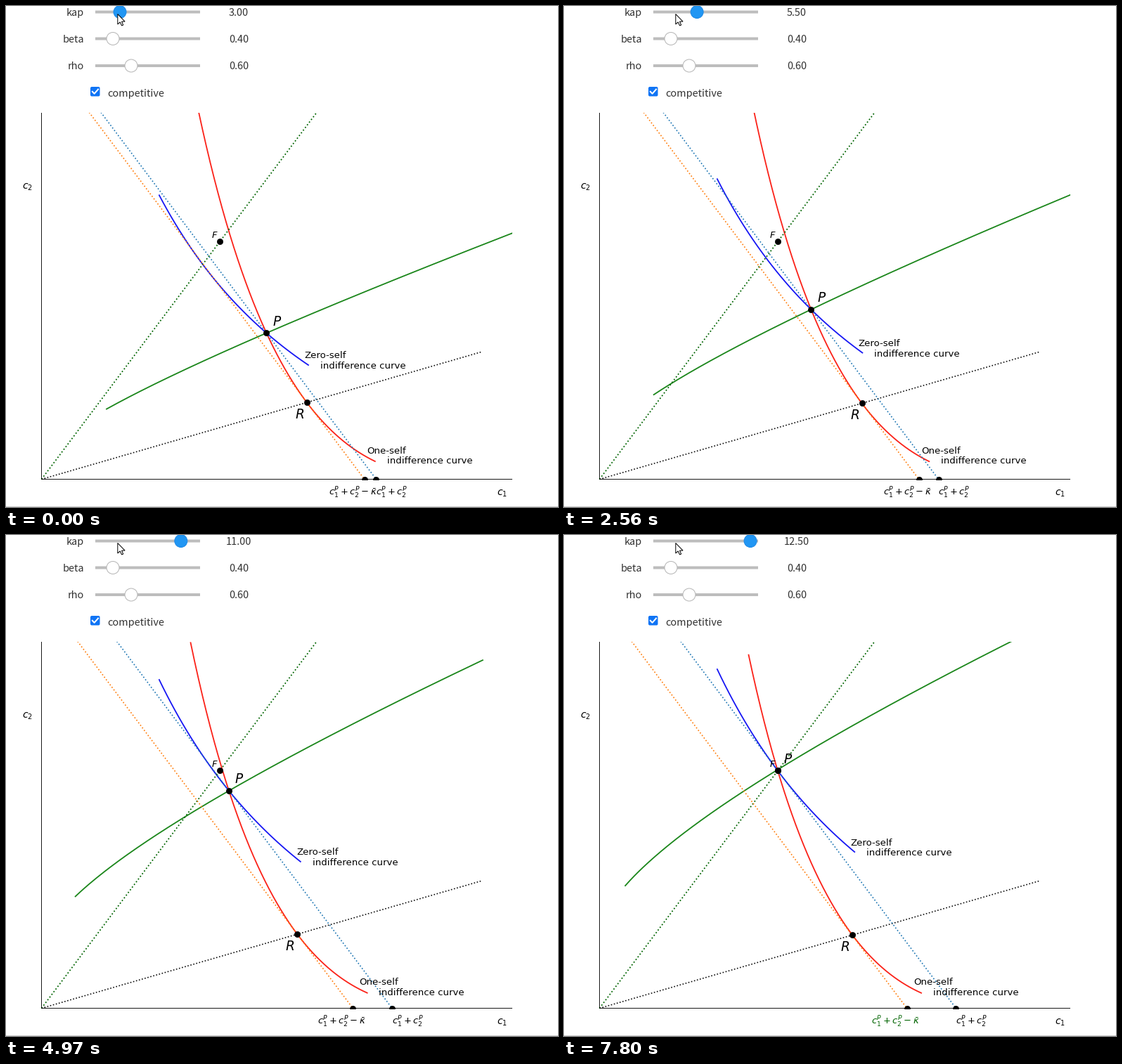
Recreate the animation shown at these times as a matplotlib script. Size 785 px wide and 713 px high, loop 8000 ms.

```python
import numpy as np
import matplotlib.pyplot as plt
from matplotlib.animation import FuncAnimation
from matplotlib.patches import Circle, FancyBboxPatch, Polygon, Rectangle

W, H, DPI = 785, 713, 64
PT = 72 / DPI                      # points per pixel
LOOP, STEP = 8000, 40
X0, Y0, SX, SY = 50.5, 673.5, 5.58, 7.443
BETA, RHO, WEALTH = 0.4, 0.6, 300
E = 1 - RHO
UI = ["Noto Sans CJK JP", "DejaVu Sans"]
INK = "#333333"
LAG = 400                          # the plot follows the slider this late


def kappa_at(t):
    """Key presses speed up, pause, then step back; each press moves 0.5."""
    presses = np.interp(t, [860, 1170, 2560, 5930, 7170, 7610],
                        [0, 1.05, 5.5, 21.05, 21.05, 19.05])
    return 3 + 0.5 * int(presses)


# ---- model -------------------------------------------------------------
RATIO = BETA ** (1 / RHO)          # c2 / c1 preferred by the one-self
R_SHARE = 1 / (1 + RATIO)
FIRST_BEST = WEALTH * RATIO / (1 + 2 * RATIO)


def one_self(c1, c2):
    return c1 ** E + BETA * c2 ** E


share = np.linspace(0.01, R_SHARE - 1e-3, 6000)
loss = 1 - (one_self(share, 1 - share) / one_self(R_SHARE, 1 - R_SHARE)) ** (1 / E)


def solve(kappa):
    """Contract point, whether kappa binds, and the feasible locus."""
    total = kappa / loss
    sums = np.arange(30, 180)
    s = np.interp(sums, total, share)
    locus = s * sums, (1 - s) * sums
    binds = np.interp(0.5, share, total) < 2 * FIRST_BEST
    if not binds:
        return FIRST_BEST, FIRST_BEST, binds, locus
    ok = (share >= 0.5) & (total < WEALTH - 1)
    a, m = share[ok], total[ok]
    utility = (WEALTH - m) ** E + BETA * m ** E * (a ** E + (1 - a) ** E)
    i = utility.argmax()
    return a[i] * m[i], (1 - a[i]) * m[i], binds, locus


def to_px(c1, c2):
    return X0 + SX * np.asarray(c1), Y0 - SY * np.asarray(c2)


# ---- stage -------------------------------------------------------------
fig = plt.figure(figsize=(W / DPI, H / DPI), dpi=DPI, facecolor="white")
ax = fig.add_axes([0, 0, 1, 1])
ax.set(xlim=(0, W), ylim=(H, 0))
ax.axis("off")
clip = Rectangle((X0 - 0.5, 152), 670, 522, transform=ax.transData)


def plot_line(color, style="-", width=1.8):
    z = 3 if style == ":" else 2
    line, = ax.plot([], [], style, color=color, lw=width * PT, zorder=z)
    line.set_clip_path(clip)
    return line


def dot():
    line, = ax.plot([], [], "o", color="black", ms=8.2 * PT, mew=0.8, zorder=5)
    line.set_clip_path(clip)
    return line


def label(x, y, text, size=13.2, **kw):
    return ax.text(x, y, text, fontsize=size * PT, va="baseline", zorder=6, **kw)


def ui_label(x, y, text, ha="left"):
    return label(x, y, text, 14.5, ha=ha, family=UI, color=INK)


def rule(xs, ys, color, width):
    ax.plot(xs, ys, color=color, lw=width * PT, zorder=1,
            solid_capstyle="butt", snap=False)


def control(name, y, x, value, fill="white", edge="#b5b5b5"):
    rule([127, 276], [y, y], "#bdbdbd", 4)
    ui_label(110.8, y + 5.5, name, "right")
    text = ui_label(331, y + 5.5, value, "center")
    knob = Circle((x, y), 9, fc=fill, ec=edge, lw=PT, zorder=7)
    return ax.add_patch(knob), text


# widgets
kap_knob, kap_text = control("kap", 8.5, 162, "3.00", "#2196f3", "#1e88e5")
control("beta", 46.5, 152, "0.40")
control("rho", 85, 178, "0.60")
ax.add_patch(FancyBboxPatch((122, 117), 9.5, 9.5, boxstyle="round,pad=2",
                            fc="#0f74f5", ec="none"))
ax.plot([122.8, 125.6, 131], [121.8, 124.8, 118.6], color="white", lw=2 * PT)
ui_label(144, 129, "competitive")
arrow = np.array([(0, 0), (0, 14.5), (3.4, 11.4), (5.7, 16.4), (7.9, 15.5),
                  (5.7, 10.6), (10.3, 10.6)]) + (158.8, 11.5)
ax.add_patch(Polygon(arrow, fc="white", ec="black", lw=PT, zorder=9))
rule([0, W], [712.5, 712.5], "#cfcfcf", 1)

# fixed parts of the plot
rule([X0, X0], [152, 674], "#1a1a1a", 1)
rule([X0, 720], [Y0, Y0], "#1a1a1a", 1)
label(23, 261, "$c_2$", 14)
label(698.5, 696.5, "$c_1$", 14)
plot_line("darkgreen", ":").set_data(*to_px([0, 70], [0, 70]))
plot_line("black", ":", 1.6).set_data(*to_px([0, 112], [0, 112 * RATIO]))
dot().set_data(*to_px([FIRST_BEST], [FIRST_BEST]))
label(292.5, 329.5, "$F$", 13)

# moving parts
budget = plot_line("tab:blue", ":", 1.7)
outside = plot_line("tab:orange", ":", 1.7)
feasible = plot_line("#1a861a")
red = plot_line("#fb2118")
blue = plot_line("#1616f4")
dots = [dot() for _ in range(4)]
p_label = label(0, 0, "$P$", 18.5)
r_label = label(0, 0, "$R$", 18.5)
zero_text = label(0, 0, "Zero-self"), label(0, 0, "indifference curve")
one_text = label(0, 0, "One-self"), label(0, 0, "indifference curve")
net_label = label(0, 696.7, r"$c_1^P + c_2^P - \bar{\kappa}$", 13)
sum_label = label(0, 696.7, r"$c_1^P + c_2^P$", 13)


def place_pair(pair, x, y, indent):
    pair[0].set_position((x, y - 14.5))
    pair[1].set_position((x + indent, y))


def draw_plot(kappa):
    p1, p2, binds, locus = solve(kappa)
    total = p1 + p2
    net = total - kappa
    r1 = net * R_SHARE

    budget.set_data(*to_px([total - 75, total], [75, 0]))
    outside.set_data(*to_px([net - 75, net], [75, 0]))
    feasible.set_data(*to_px(*locus))

    c1 = np.arange(38, int(r1 + 18) + 1)
    x, y = to_px(c1, ((one_self(p1, p2) - c1 ** E) / BETA) ** (1 / E))
    red.set_data(x, y)
    place_pair(one_text, x[-1] - 2 * SX, y[-1] + 3, 28)

    c1 = np.arange(30, int(r1 + 1) + 1)
    x, y = to_px(c1, (p1 ** E + p2 ** E - c1 ** E) ** (1 / E))
    blue.set_data(x, y)
    place_pair(zero_text, x[-1] - SX, y[-1] + 5, 22.5)

    spots = [(p1, p2), (r1, net - r1), (total, 0), (net, 0)]
    (px, py), (rx, ry), (sum_x, _), (net_x, _) = px_spots = [to_px(*c) for c in spots]
    for mark, (x, y) in zip(dots, px_spots):
        mark.set_data([x], [y])
    p_label.set_position((px + 8.3, py - 10.5))
    r_label.set_position((rx - 17, ry + 23))
    sum_label.set_x(sum_x - 0.3)
    net_label.set_x(net_x - 50.3)
    net_label.set_color("black" if binds else "darkgreen")


def update(i):
    t = (i + 0.5) * STEP
    kap = kappa_at(t)
    kap_knob.center = (162 + 10.85 * (kap - 3), 8.5)
    kap_text.set_text(f"{kap:.2f}")
    draw_plot(kappa_at(t - LAG))
    return []


anim = FuncAnimation(fig, update, frames=LOOP // STEP, interval=STEP,
                     repeat=True, repeat_delay=0, blit=False)
plt.show()
```
